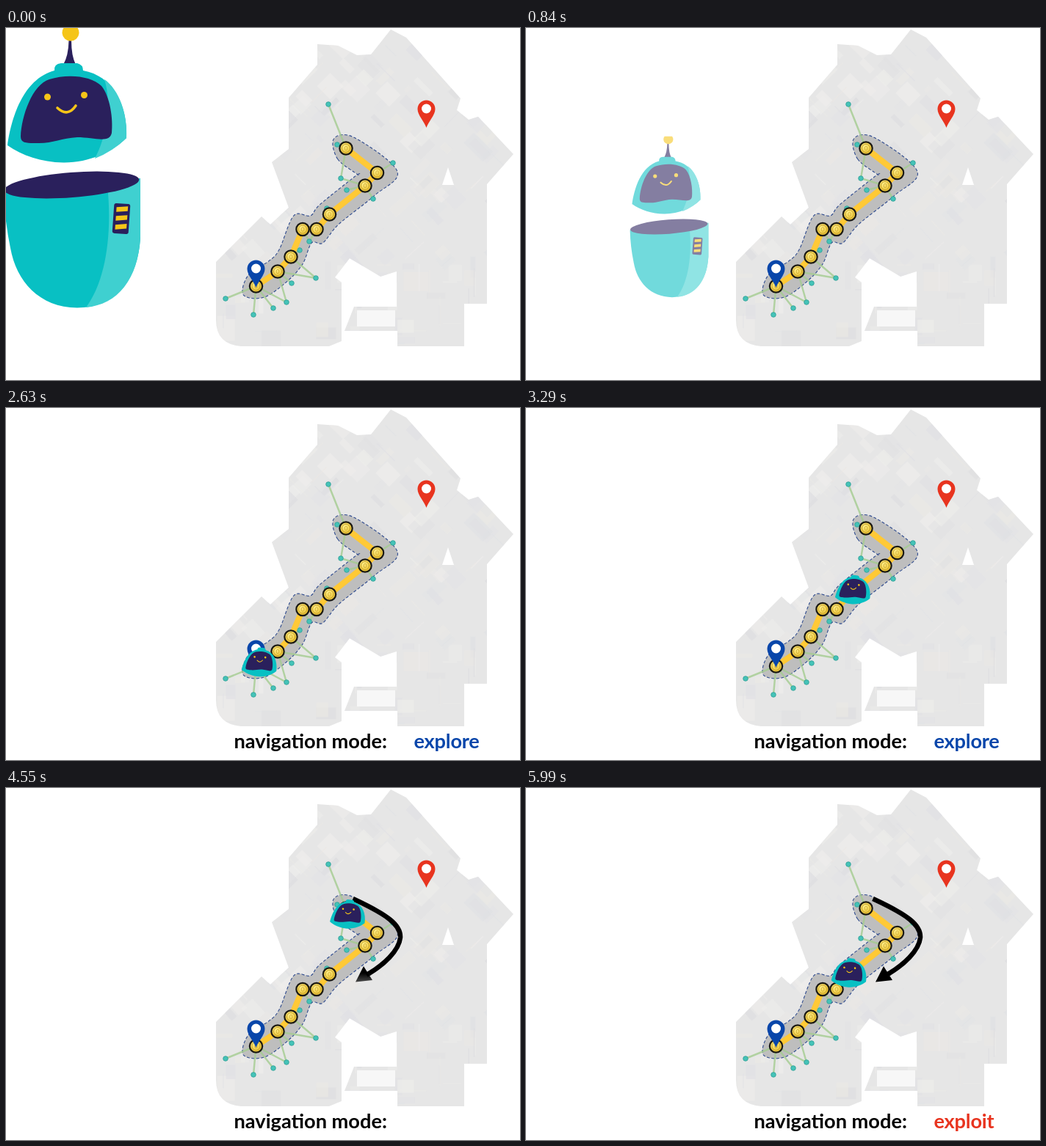
An HTML page for the animation above (8060 ms loop, 700x480 px).

```html
<!DOCTYPE html>
<html lang="en">
<head>
<meta charset="utf-8">
<title>Navigation modes</title>
<style>
html, body { margin: 0; width: 100%; height: 100%; overflow: hidden; background: #fff; }
svg { display: block; width: 100vw; height: 100vh; }
text { font: 700 27.2px Lato, "Open Sans", sans-serif; }
.mode { letter-spacing: -0.2px; }
</style>
</head>
<body>
<svg viewBox="0 0 700 480" xmlns="http://www.w3.org/2000/svg">
  <defs>
    <path id="floor" d="M524 2 L545 13 619 96 614 112 630 125 643 121 691 172 655 213 V376 H624 V434 H533 V413 H461 L474 380 H532
      V332 L510 339 468 314 448 340 457 347 V427 L440 434 H320 Q286 431 286 398 V319 L348 257 360 268 385 245 362 183 385 165
      V95 L424 50 V22 L452 24 478 37 497 36 Z"/>
    <clipPath id="inside"><use href="#floor"/></clipPath>
    <path id="dome" fill="#08c0c3" d="M2 160 C7 125 22 70 66 58 Q65 49 75 48 H97 Q105 50 105 58
      C145 65 166 104 164 150 C145 169 112 184 78 183.500 C48 183 22 174 2 160 Z"/>
    <g id="face">
      <path fill="#2a205c" d="M20 148 C21 120 36 77 59 70 C84 62 116 65 130 79 C142 94 146 124 144 143
        C141 158 120 149 97 149 C76 150 64 157 45 157 C30 157 20 158 20 148 Z"/>
      <g fill="#f5c518"><circle cx="56.500" cy="94" r="4.500"/><circle cx="106.500" cy="91.500" r="4.500"/></g>
      <path fill="none" stroke="#f5c518" stroke-width="3.600" stroke-linecap="round" d="M70 109 Q84 122 95 106"/>
    </g>
    <g id="pin">
      <path d="M0 0 C-3 -9 -12 -17 -12 -25.500 A12 12 0 0 1 12 -25.500 C12 -17 3 -9 0 0 Z"/>
      <circle cy="-26" r="6.500" fill="#fff"/>
    </g>
    <radialGradient id="gold" cx=".4" cy=".35">
      <stop offset="0" stop-color="#fff08a"/><stop offset="1" stop-color="#eec93c"/>
    </radialGradient>
    <g id="coin">
      <circle r="8.700" fill="url(#gold)" stroke="#1c1a14" stroke-width="2.200"/>
      <circle r="5.600" fill="none" stroke="#c09a2c" stroke-width=".9"/>
      <ellipse rx="1.800" ry="2.800" fill="none" stroke="#d3ad38" stroke-width=".9"/>
    </g>
    <linearGradient id="wipe" gradientUnits="userSpaceOnUse" x1="0" x2="0">
      <stop offset="0"/><stop offset="1" stop-opacity="0"/>
    </linearGradient>
  </defs>

  <use href="#floor" fill="#e6e6e6"/>
  <g id="rooms" clip-path="url(#inside)"></g>
  <path fill="#fff" d="M602 190 L610 214 H594 Z"/>
  <rect x="478" y="385" width="52" height="22" fill="#fff" opacity=".7"/>

  <path id="corridor" fill="#bebebe" stroke="#2f4b8f" stroke-width="1.100" stroke-dasharray="4 2.500"/>
  <path id="links" fill="none" stroke="#a4cc90" stroke-opacity=".8" stroke-width="2.500"/>
  <g id="nodes" fill="#45c3b8" stroke="#2f9d95" stroke-width=".8"></g>
  <path id="trail" fill="none" stroke="#ffc936" stroke-width="8"/>
  <g id="coins"></g>
  <use href="#pin" x="340.500" y="354" fill="#0846aa"/>
  <use href="#pin" x="572.500" y="136" fill="#e8341f"/>

  <g id="arrow">
    <path fill="none" stroke="url(#wipe)" stroke-width="6.500" d="M472.500 151 C520 173 538 187 537 204 C535 222 515 241 491 255"/>
    <path fill="url(#wipe)" d="M476 264.500 L487 243 L499 262 Z"/>
  </g>

  <g id="scout"><use href="#dome"/><use href="#face"/></g>

  <g id="robot">
    <path fill="#2a205c" d="M85.500 17 H89 Q89 38 95 50 H78 Q85 38 85.500 17 Z"/>
    <path fill="#f5c518" d="M79 -.8 H97 A11.500 11.500 0 1 1 79 -.8 Z"/>
    <use href="#dome"/>
    <path fill="#3fd0d0" d="M134 70 C154 84 166 118 164 150 Q146 168 121 178 C136 150 145 105 134 70 Z"/>
    <use href="#face"/>
    <path fill="#08c0c3" d="M-3 222 L183 205 V285 C180 345 148 381 97 381.500 C45 381 14 345 6 300 Q-2 262 -3 222 Z"/>
    <path fill="#3fd0d0" d="M138 215 L183 205 V285 C180 343 152 377 109 381 C136 345 145 280 138 215 Z"/>
    <ellipse cx="89.500" cy="214" rx="92" ry="17" fill="#2a205c" transform="rotate(-4.500 89.500 214)"/>
    <g transform="rotate(4 157 260)">
      <rect x="146" y="239.500" width="22" height="41" rx="3" fill="#2a205c"/>
      <path transform="skewY(-8) translate(0 22)" stroke="#f5c518" stroke-width="6.500" d="M149.500 247 h15.500 m0 12 h-15.500 m0 12 h15.500"/>
    </g>
  </g>

  <g id="caption">
    <text x="310.500" y="463.500">navigation mode:</text>
    <text id="explore" class="mode" x="555.500" y="463.500" fill="#0846aa">explore</text>
    <text id="exploit" class="mode" x="555.500" y="463.500" fill="#e8341f">exploit</text>
  </g>
  <path id="outward" fill="none"/>
  <path id="back" fill="none"/>
</svg>
<script>
const $ = id => document.getElementById(id);
const LOOP = 8060;

function add(parent, tag, attrs) {
  const el = document.createElementNS('http://www.w3.org/2000/svg', tag);
  for (const k in attrs) el.setAttribute(k, attrs[k]);
  parent.appendChild(el);
}

// Faint furniture and walls, turned to follow the two wings
let seed = 11;
const rnd = () => (seed = (seed * 16807) % 2147483647) / 2147483647;
const tones = ['#efeeec', '#dddde0', '#ebe9e5', '#e0e1e5'];
for (let i = 0; i < 220; i++) {
  const x = 290 + rnd() * 400, y = 5 + rnd() * 425;
  const w = 6 + rnd() * 34, h = rnd() < .3 ? 1.5 : 5 + rnd() * 22;
  const turn = (y < 215 ? 45 : y < 320 ? -42 : 0) + (rnd() < .5 ? 90 : 0);
  add($('rooms'), 'rect', {
    x: -w / 2, y: -h / 2, width: w, height: h, fill: tones[i % 4],
    opacity: .3 + rnd() * .4, transform: `translate(${x} ${y}) rotate(${turn})`
  });
}

const line = points => 'M' + points.join('L');
const distance = (a, b) => Math.hypot(a[0] - b[0], a[1] - b[1]);

function direction(a, b) {
  const d = distance(a, b);
  return [(b[0] - a[0]) / d, (b[1] - a[1]) / d];
}

// Closed smooth curve through points
function smooth(p) {
  const n = p.length, at = i => p[(i + n) % n];
  let d = 'M' + p[0];
  for (let i = 0; i < n; i++) {
    const [a, b, c, e] = [at(i - 1), at(i), at(i + 1), at(i + 2)];
    const c1 = b.map((v, k) => v + (c[k] - a[k]) / 6);
    const c2 = c.map((v, k) => v - (e[k] - b[k]) / 6);
    d += `C${c1} ${c2} ${c}`;
  }
  return d + 'Z';
}

// Outline at a fixed distance around an open line, mitred at its points
function outline(p, r, cap) {
  const left = [], right = [], last = p.length - 1;
  p.forEach(([x, y], i) => {
    const a = direction(p[Math.max(0, i - 1)], p[Math.max(1, i)]);
    const b = direction(p[Math.min(last - 1, i)], p[Math.min(last, i + 1)]);
    const k = r / (1 + a[0] * b[0] + a[1] * b[1]);
    const nx = -(a[1] + b[1]) * k, ny = (a[0] + b[0]) * k;
    left.push([x + nx, y + ny]);
    right.unshift([x - nx, y - ny]);
  });
  const tip = (end, before) => direction(before, end).map((v, k) => end[k] + v * cap);
  return [...left, tip(p[last], p[last - 1]), ...right, tip(p[0], p[1])];
}

const coins = [[463, 164], [505.5, 197.5], [489, 215], [440.5, 254], [423, 274.5], [404, 274.5], [388, 312], [370, 332], [340.5, 352]];
$('trail').setAttribute('d', line(coins));
$('corridor').setAttribute('d', smooth(outline(coins, 18.5, 21)));
for (const [x, y] of coins) add($('coins'), 'use', { href: '#coin', x, y });

// Side nodes, each linked to the coins about as near as its nearest one
const nodes = [
  [439, 104], [451, 159], [456, 205], [464, 221], [527, 184], [500, 233], [437, 246], [413, 291],
  [400, 303], [422, 341], [389, 348], [382, 374], [364, 382], [337, 391], [299, 369]
];
let links = '';
for (const node of nodes) {
  const reach = 1.3 * Math.min(...coins.map(c => distance(c, node)));
  for (const c of coins) if (distance(c, node) <= reach) links += line([node, c]);
  add($('nodes'), 'circle', { cx: node[0], cy: node[1], r: 3.3 });
}
$('links').setAttribute('d', links);

// The scout follows the coins and rests beside the last one
const stops = [[466, 174], ...coins.slice(1)];
$('back').setAttribute('d', line(stops.slice(0, 4)));
$('outward').setAttribute('d', line(stops.reverse()));

const part = (t, start, length) => Math.min(1, Math.max(0, (t - start) / length));
const ease = u => (1 - Math.cos(Math.PI * u)) / 2;
const show = (id, on) => $(id).setAttribute('visibility', on ? 'visible' : 'hidden');

function along(id, u) {
  const path = $(id);
  return path.getPointAtLength(path.getTotalLength() * u);
}

function draw(time) {
  // The picture advances in steps of 60 ms with two long rests
  const base = time < 1910 ? 0 : 1910;
  const t = Math.min(5990, base + Math.floor((time - base) / 60) * 60);

  const move = ease(part(t, 178, 1475));
  const size = 1 - part(t, 455, 904);
  show('robot', t <= 1320 && size > 0);
  $('robot').setAttribute('transform',
    `translate(${90 + 250 * move} ${190 + 160 * move}) scale(${size}) translate(-90 -190)`);
  $('robot').setAttribute('opacity', size);

  show('caption', t >= 1910);
  show('explore', t >= 1910 && t < 4010);
  show('exploit', t >= 4850);

  const out = ease(part(t, 2488, 1500)), back = ease(part(t, 4900, 1090));
  const p = back > 0 ? along('back', back) : along('outward', out);
  $('scout').setAttribute('opacity', part(t, 1910, 500));
  $('scout').setAttribute('transform',
    `translate(${p.x} ${p.y - 2}) scale(.292) rotate(6) translate(-83 -116)`);

  const edge = 108 + 160 * part(t, 4100, 500);
  show('arrow', t > 4100);
  $('wipe').setAttribute('y1', edge);
  $('wipe').setAttribute('y2', edge + 40);
}

let origin;
function tick(now) {
  origin ??= now;
  draw((now - origin) % LOOP);
  requestAnimationFrame(tick);
}
draw(0);
requestAnimationFrame(tick);
</script>
</body>
</html>
```
